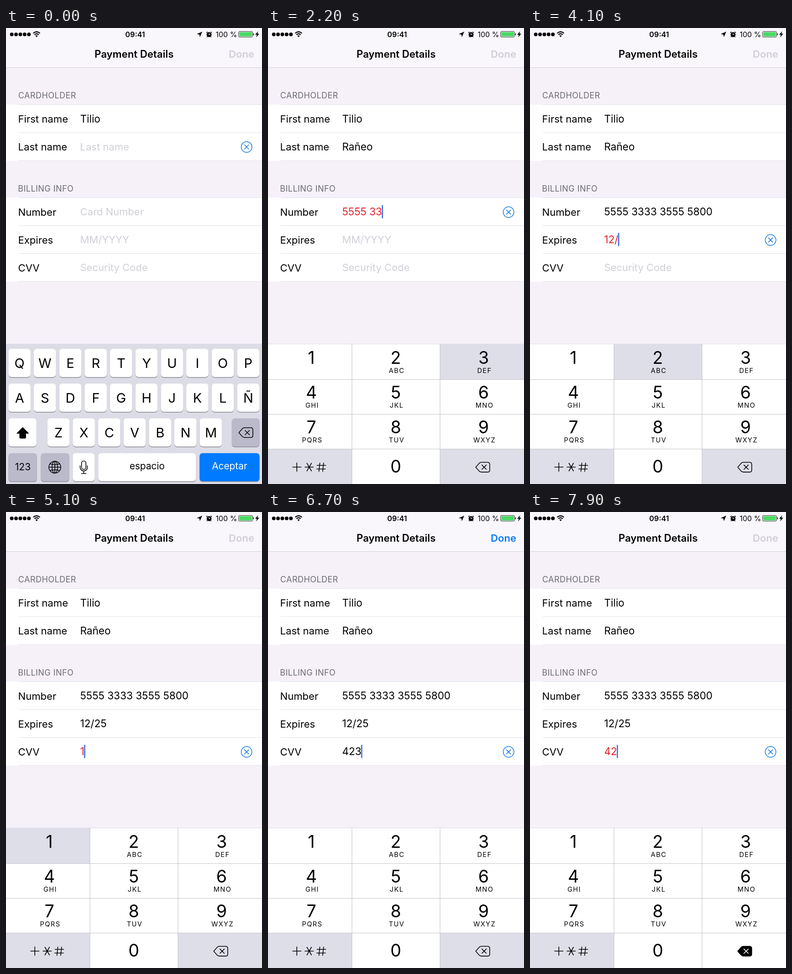
An HTML page that plays this animation: 561x998 px, repeating every 8000 ms.

```html
<!DOCTYPE html>
<html lang="en">
<head>
<meta charset="utf-8">
<title>Payment form</title>
<style>
html, body { margin: 0; width: 100%; height: 100%; overflow: hidden; background: #f6f1f9; }
svg { display: block; width: 561px; height: 998px; font: 22.1px Inter, "Liberation Sans", sans-serif; }
text { white-space: pre; }
.line { fill: none; stroke: #000; stroke-width: 1.6; stroke-linecap: round; stroke-linejoin: round; }
</style>
</head>
<body>
<svg id="stage" viewBox="0 0 561 998">
  <g id="screen"></g>
  <rect id="caret" width="2.6" height="29" rx="1" fill="#3c6ae6"/>
</svg>
<script>
const LOOP = 8000;
const BLUE = '#0a7aff', GREY = '#d0cfd7', RED = '#e2202d';
const screenEl = document.getElementById('screen');
const caret = document.getElementById('caret');

const rows = [
  { y: 199, label: 'First name', hint: 'First name' },
  { y: 260, label: 'Last name', hint: 'Last name' },
  { y: 402.6, label: 'Number', hint: 'Card Number', full: 19 },
  { y: 463.6, label: 'Expires', hint: 'MM/YYYY', full: 5 },
  { y: 524.6, label: 'CVV', hint: 'Security Code', full: 3 }
];

// Each step: time, active row, text of that row, key held down
const steps = [[-690, 1, '', '']];
const add = (row, ...list) => list.forEach(([t, text, key = '']) => steps.push([t, row, text, key]));
add(1, [400, 'R', 'R'], [700, 'Ra', 'a'], [980, 'Rañ', 'ñ'], [1080, 'Rañe', 'e'], [1200, 'Rañeo', 'o']);
add(2, [1590, '']);
const card = '5555333335555800';
[...card].forEach((d, i) =>
  add(2, [1680 + 100 * i, card.slice(0, i + 1).replace(/(.{4})(?=.)/g, '$1 '), d]));
add(3, [3400, ''], [3780, '1', '1'], [4080, '12/', '2'], [4280, '12/2', '2'], [4380, '12/25', '5']);
add(4, [4790, ''], [5090, '1', '1'], [5290, '12', '2'], [5490, '123', '3'],
  [5990, '12', 'del'], [6130, '1', 'del'], [6270, '', 'del'],
  [6390, '4', '4'], [6490, '42', '2'], [6580, '423', '3'],
  [6990, '42', 'del'], [7380, '423', '3'], [7840, '42', 'del']);

const rect = (x, y, w, h, fill, r = 0) =>
  `<rect x="${x}" y="${y}" width="${w}" height="${h}" rx="${r}" fill="${fill}"/>`;
const text = (x, y, s, attrs = '') => `<text x="${x}" y="${y}" ${attrs}>${s}</text>`;
const mid = (x, y, s, size, attrs = '') =>
  text(x, y, s, `text-anchor="middle" font-size="${size}" ${attrs}`);
const path = (d, attrs = 'class="line"') => `<path d="${d}" ${attrs}/>`;
const at = (x, y, s) => `<g transform="translate(${x} ${y})">${s}</g>`;

function statusBar() {
  let s = '';
  for (let i = 0; i < 5; i++) s += `<circle cx="${12.6 + 9.4 * i}" cy="14" r="4"/>`;
  s += path('M59.5 11.5Q67 5 74.5 11.5M62.3 14.6Q67 10.7 71.7 14.6',
    'fill="none" stroke="#000" stroke-width="2.2"');
  s += path('M64.3 17Q67 15 69.7 17L67 20Z', '');
  s += mid(283, 20, '09:41', 16.2, 'font-weight="600"');
  s += path('M430 8L424.8 20L423.8 14.2L418 13.2Z', '');
  s += '<circle cx="445" cy="14.5" r="5.4"/>' +
    path('M445 11.5V14.5H447.6', 'fill="none" stroke="#fff" stroke-width="1.2"') +
    path('M439 10.6L441.6 8.4M448.4 8.4L451 10.6M441.5 18.5L440.3 20M448.5 18.5L449.7 20',
      'stroke="#000" stroke-width="1.5"');
  s += text(459.5, 20, '100 %', 'font-size="16"');
  s += '<rect x="509.5" y="7.5" width="31" height="12.5" rx="2.5" fill="none" stroke="#333"/>' +
    rect(511, 9, 28, 9.5, '#4cd964', 1) + rect(541.4, 11.5, 1.8, 4.5, '#333', 1);
  return s + path('M552.5 7L546 14.8H549.8L548.2 20.5L555 12.4H551Z', '');
}

function form() {
  let s = rect(0, 0, 561, 998, '#f6f1f9') + rect(0, 0, 561, 86.5, '#f9f7fc') +
    rect(0, 86.2, 561, 1, '#cfcdd5') + statusBar();
  s += mid(280.7, 65.2, 'Payment Details', 22.2, 'font-weight="600"');
  const head = 'font-size="18" letter-spacing=".45" fill="#6d6c73"';
  s += text(26.8, 154.4, 'CARDHOLDER', head) + text(26.3, 357.8, 'BILLING INFO', head);
  s += rect(0, 167.5, 561, 123, '#fff') + rect(0, 371, 561, 184, '#fff');
  for (const y of [167, 228.5, 289.5, 371, 432, 493, 554]) s += rect(28, y, 533, 1, '#e3e1e9');
  return s + rows.map(r => text(26.5, r.y + 8, r.label)).join('');
}

const backspace = on =>
  path('M-15 0L-7.5 -8.5Q-5 -10.7 -3 -10.7H11Q15.7 -10.7 15.7 -6V6Q15.7 10.7 11 10.7H-3Q-5 10.7 -7.5 8.5Z',
    `class="line" style="fill:${on ? '#000' : 'none'}"`) +
  path('M-1.4 -4.8L8.2 4.8M8.2 -4.8L-1.4 4.8', `class="line" style="stroke:${on ? '#fff' : '#000'}"`);

const keyBox = (x, y, w, fill = '#fff') =>
  rect(x, y + 1.6, w, 61.6, '#8c8c96', 6.5) + rect(x, y, w, 61.6, fill, 6.5);

const letterRows = [['qwertyuiop', 5.3], ['asdfghjklñ', 5.3], ['zxcvbnm', 90.6]];

function popup(x, y, key) {
  const left = Math.max(2, Math.min(x - 19, 472.5)), right = left + 86.5, end = x + 48.6;
  const d = `M${left + 10} ${y - 78}H${right - 10}Q${right} ${y - 78} ${right} ${y - 68}V${y - 24}` +
    `C${right} ${y - 8} ${end} ${y - 8} ${end} ${y + 8}V${y + 55}Q${end} ${y + 62} ${end - 7} ${y + 62}` +
    `H${x + 7}Q${x} ${y + 62} ${x} ${y + 55}V${y + 8}` +
    `C${x} ${y - 8} ${left} ${y - 8} ${left} ${y - 24}V${y - 68}Q${left} ${y - 78} ${left + 10} ${y - 78}Z`;
  return path(d, 'fill="#fff" stroke="#c4c4ce"') +
    mid((left + right) / 2, y - 24, key, 46, 'font-weight="300"');
}

function letters(caps, held) {
  const dark = '#babacb';
  let s = rect(0, 691, 561, 307, '#dcdce7'), bubble = '';
  letterRows.forEach(([keys, x0], r) => [...keys].forEach((k, i) => {
    const x = x0 + 55.68 * i, y = 702.3 + 76 * r;
    s += keyBox(x, y, 48.6) + (caps
      ? mid(x + 24.4, y + 41.4, k.toUpperCase(), 29)
      : mid(x + 24.4, y + 39, k, 31, 'font-weight="300"'));
    if (held.toLowerCase() === k) bubble = popup(x, y, held);
  }));
  s += keyBox(5.3, 854.3, 61.5, caps ? '#fff' : dark) +
    path('M36.6 874.5L49 887H43V896Q43 897.7 41.3 897.7H32Q30.2 897.7 30.2 896V887H24.2Z',
      `class="line" style="fill:${caps ? '#000' : 'none'}"`);
  s += keyBox(494.8, 854.3, 60.6, dark) + at(525.3, 885.5, backspace(false));
  s += keyBox(5.3, 930.4, 62.5, dark) + mid(37, 968, '123', 21);
  s += keyBox(76.4, 930.4, 62, dark) + at(107, 961.3,
    '<g class="line" style="stroke-width:1.5"><circle r="13"/><ellipse rx="6.2" ry="13"/>' +
    '<path d="M0 -13V13M-13 0H13M-10.5 -7.5Q0 -3.5 10.5 -7.5M-10.5 7.5Q0 3.5 10.5 7.5"/></g>');
  s += keyBox(146.3, 930.4, 47.8) +
    '<rect class="line" x="165.6" y="947.5" width="9.6" height="18.5" rx="4.8"/>' +
    path('M162.4 958V961.5A8 8 0 0 0 178.4 961.5V958M170.4 969.5V975M165.5 975H175.3');
  s += keyBox(202.2, 930.4, 214) + mid(309.2, 966, 'espacio', 20.8);
  s += keyBox(424.2, 930.4, 131.3, '#007aff') + mid(490, 966, 'Aceptar', 20.8, 'fill="#fff"');
  return s + bubble;
}

function keypad(held) {
  const dark = '#dedee9', xs = [0, 184, 377, 561], ys = [691, 769, 845, 921, 998];
  const subs = ['', 'ABC', 'DEF', 'GHI', 'JKL', 'MNO', 'PQRS', 'TUV', 'WXYZ'];
  const keys = [...'123456789', 'sym', '0', 'del'];
  let s = '';
  keys.forEach((k, i) => {
    const c = i % 3, r = i / 3 | 0, x = [95, 280, 472.5][c], y = ys[r], top = 693 + 76 * r;
    const special = k === 'sym' || k === 'del';
    s += rect(xs[c], y, xs[c + 1] - xs[c], ys[r + 1] - y, (held === k) !== special ? dark : '#fff');
    if (!special) s += mid(x, top + (r === 3 ? 52.2 : 41.6), k, 37.5);
    if (subs[i]) s += mid(x + 2, top + 62.2, subs[i], 14.6, 'letter-spacing="1.4"');
  });
  for (const y of ys.slice(0, 4)) s += rect(0, y, 561, 1, y === 691 ? '#dddde4' : '#c5c5ca');
  for (const x of [183.5, 376.5]) s += rect(x, 691, 1, 307, '#c0c0c6');
  s += path('M54 961H72.5M63.2 951.7V970.3M81 961H99.5M85.3 952.5L95.2 969.5M95.2 952.5L85.3 969.5' +
    'M113.6 952L111.6 970.5M121.8 952L119.8 970.5M107.5 957.2H126.5M106.8 965.2H125.8');
  return s + at(470.2, 961.2, backspace(held === 'del'));
}

const base = form();

function view(t) {
  const past = steps.filter(s => s[0] <= t);
  const [time, active, , key] = past[past.length - 1];
  const held = t - time < (active === 1 ? 140 : 100) ? key : '';
  const values = ['Tilio', '', '', '', ''];
  past.forEach(([, row, value]) => values[row] = value);

  let s = base + text(488, 65.2, 'Done',
    `font-weight="600" fill="${values[4].length === 3 ? BLUE : GREY}"`);
  rows.forEach((r, i) => {
    const v = values[i], wrong = i === active && r.full && v.length < r.full;
    s += text(162.5, r.y + 7.8, v || r.hint,
      `${i === active ? 'id="field"' : ''} font-size="${v ? 22.5 : 22}" ` +
      `fill="${!v ? GREY : wrong ? RED : '#000'}"`);
  });
  s += at(527.2, rows[active].y + .4, `<g class="line" style="stroke:#1579e0;stroke-width:1.5">` +
    '<circle r="11.7"/><path d="M-4.6 -4.6L4.6 4.6M4.6 -4.6L-4.6 4.6"/></g>');
  s += active === 1 ? letters(t < 540, held) : keypad(held);
  return { s, row: rows[active], value: values[active], idle: t - time };
}

function blink(ms) {
  const p = ms % 1000;
  if (p < 500) return 1;
  return p < 800 ? Math.max(0, (700 - p) / 200) : (p - 800) / 200;
}

let shown = '';
function draw() {
  const { s, row, value, idle } = view(performance.now() % LOOP);
  if (s !== shown) screenEl.innerHTML = shown = s;
  const width = value ? document.getElementById('field').getComputedTextLength() : .5;
  caret.setAttribute('x', 161.9 + width);
  caret.setAttribute('y', row.y - 15);
  caret.setAttribute('opacity', blink(idle));
  requestAnimationFrame(draw);
}
draw();
</script>
</body>
</html>
```
